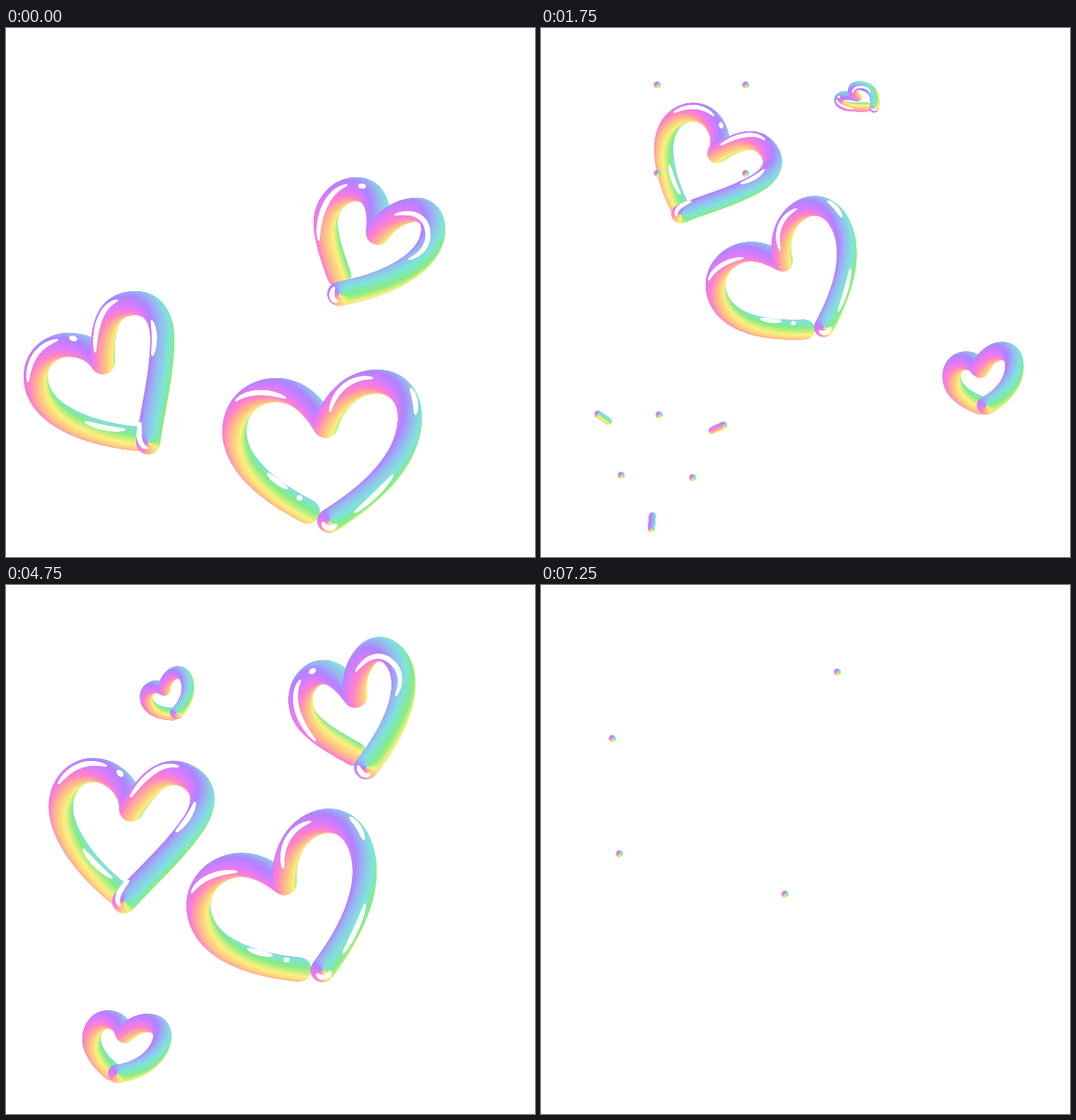
Recreate the animation shown at these times as an HTML page with a canvas. Size 748 by 748 pixels, loop 7.5 s.

```html
<!DOCTYPE html>
<html lang="en">
<head>
<meta charset="utf-8">
<title>Rainbow hearts</title>
<style>
  html, body { margin: 0; height: 100%; overflow: hidden; background: #fff; }
  canvas { display: block; }
</style>
</head>
<body>
<canvas id="stage" width="748" height="748"></canvas>
<script>
const ctx = document.getElementById('stage').getContext('2d');
const STEP = 250, STEPS = 15;
const { PI, sin, cos, min, max } = Math;
const rad = degrees => degrees * PI / 180;

// Tubes are built by stamping a rainbow disc along a path.
const disc = new Path2D();
disc.arc(0, 0, 1, 0, PI * 2);
const rainbow = ctx.createConicGradient(0, 0, 0);
['#7fe3dc', '#84ec86', '#fbf17c', '#ffbe85', '#ff80cc', '#d97bff', '#ae84ff', '#96baf0', '#7fe3dc']
  .forEach((color, i) => rainbow.addColorStop(i / 8, color));

const cache = new Map();
function sample(d) {
  if (!cache.has(d)) {
    const path = document.createElementNS('http://www.w3.org/2000/svg', 'path');
    path.setAttribute('d', d);
    const length = path.getTotalLength(), n = Math.ceil(length);
    cache.set(d, Array.from({ length: n + 1 }, (_, i) => path.getPointAtLength(length * i / n)));
  }
  return cache.get(d);
}

function stamp(d, place, radius, angle, fill) {
  const points = sample(d);
  ctx.fillStyle = fill;
  points.forEach((p, i) => {
    const [x, y] = place(p), r = radius(i / (points.length - 1));
    const c = r * cos(angle), s = r * sin(angle);
    ctx.setTransform(c, s, -s, c, x, y);
    ctx.fill(disc);
  });
}

// Size over time: big hearts stay and then dwindle, small ones swell and collapse.
const dwindle = (life, ease) => k => 1 - (max(0, k - 4) / life) ** ease;
const bloom = (born, life) => k => max(0, sin(PI * min(1, max(0, (k - born) / life)))) ** .7;

// Big hearts pass through a few spots; speed is constant between them.
const SPOT_STEPS = [0, 1, 4, 6, 9];
const travel = spots => k => {
  const i = max(1, SPOT_STEPS.findLastIndex((step, j) => step <= k && j < 4) + 1);
  const t = (k - SPOT_STEPS[i - 1]) / (SPOT_STEPS[i] - SPOT_STEPS[i - 1]);
  return spots[i].map((v, axis) => spots[i - 1][axis] + (v - spots[i - 1][axis]) * t);
};

const bigHeart = (heart, spots) =>
  ({ origin: spots[0], at: travel(spots), tube: 17, size: 1, thinning: 1, ...heart });

const smallHeart = (size, [x, y], [vx, vy], peak, turn, grow) => ({
  d: 'M-5,56C-25,46 -45,30 -45,11C-45,-5 -35,-15 -23,-15C-10,-15 -5,-8 0,0' +
    'C8,-14 20,-24 35,-24C46,-24 53,-15 53,-4C53,20 35,45 3,57',
  origin: [0, 0], tube: 13, thinning: 0, hue: -45, shine: [],
  at: k => [x + vx * (k - peak), y + vy * (k - peak)], size, turn, grow
});

const hearts = [
  bigHeart({
    d: 'M190,581C140,578 42,555 42,493C42,465 65,448 88,448C112,448 128,458 137,473' +
      'C135,430 140,389 183,389C208,389 221,410 221,440C221,490 207,540 201,586',
    hue: -55, turn: k => 8.5 * k, grow: dwindle(5, 3),
    shine: ['M31,500C31,470 46,448 73,441', 'M91,438L99,440', 'M126,458C125,425 134,392 158,385',
      'M206,414Q213,435 207,463', 'M112,557Q140,568 168,568', 'M190,558C186,575 188,592 200,594']
  }, [[137, 473], [144, 451], [177, 318], [235, 212], [275, 110]]),
  bigHeart({
    d: 'M471,350C460,320 452,295 452,275C452,250 472,228 495,228C520,228 530,250 526,290' +
      'C540,268 562,257 580,257C595,257 604,268 604,284C604,325 555,360 471,376',
    hue: -40, turn: k => -10.3 * k, grow: dwindle(3.5, 3),
    shine: ['M442,300C440,265 455,230 482,222', 'M500,223L507,224',
      'M550,264C585,255 600,275 596,300C592,315 582,322 570,327', 'M464,367C457,378 463,388 469,386']
  }, [[526, 290], [527, 268], [494, 157], [458, 107], [425, 78]]),
  bigHeart({
    d: 'M427,684C380,660 323,620 323,570C323,535 350,512 382,512C415,512 435,535 452,563' +
      'C460,535 485,500 525,500C552,500 571,520 571,550C571,605 525,655 457,697',
    hue: -28, turn: k => -33 * sin(PI * k / 12) ** 3, grow: dwindle(9.3, 1.5),
    shine: ['M325,527C340,513 370,512 395,523', 'M458,542C465,510 490,492 518,495',
      'M572,510Q581,525 579,546', 'M493,685Q528,658 547,632', 'M370,630Q382,642 398,651',
      'M413,664L417,665', 'M448,699C450,708 460,710 467,702']
  }, [[452, 563], [447, 534], [394, 422], [350, 361], [326, 270]]),
  smallHeart(.68, [224, 148], [2, -12], 4, k => -6 * k, bloom(1, 4.9)),
  smallHeart(1, [168, 635], [-4, -16], 4, k => 14 - 14 * (k - 4), bloom(1.2, 5.6)),
  smallHeart(1, [621, 504], [0, -22], 6, k => -6 * (k - 6), bloom(4, 4.6))
];

function drawHeart({ d, origin, at, tube, size, thinning, hue, shine, turn, grow }, k) {
  const scale = grow(k);
  if (scale < .3) return;
  const [x, y] = at(k), angle = rad(turn(k)), c = cos(angle), s = sin(angle);
  const sx = size * scale, sy = sx * min(1, scale + .18);
  const thickness = size * scale ** thinning;
  const place = p => {
    const px = p.x - origin[0], py = p.y - origin[1];
    return [x + (px * c - py * s) * sx, y + (px * s + py * c) * sy];
  };
  stamp(d, place, () => tube * thickness, angle + rad(hue), rainbow);
  for (const line of shine) {
    const taper = t => thickness * 3.6 * (.3 + .7 * max(0, sin(PI * t)) ** .5);
    stamp(line, place, taper, 0, '#fff');
  }
}

// Burst pieces, pointing away from the centre, in percent of the piece size.
const DOT = 'M0,0h1', BAR = 'M-50,0H50', HOOK = 'M-48,-38L-40,38L42,20';
const PETAL = 'M-50,0C-16,-28 44,-24 46,2C48,28 -16,16 -50,0';

const ring = (n, radius, phase) => ([x, y]) => Array.from({ length: n }, (_, i) => {
  const a = rad(phase + 360 * i / n);
  return [x + radius * cos(a), y + radius * sin(a)];
});
const burst = (center, at, shape, size, spots, from = at - 1) =>
  ({ center, at, shape, size, from, spots: typeof spots === 'function' ? spots(center) : spots });

const bursts = [
  burst([227, 143], 6, DOT, 5, ring(4, 79, 45)),
  burst([165, 605], 6, DOT, 5, ring(3, 52, 32)),
  burst([165, 605], 6, BAR, 26, ring(3, 84, 95)),
  burst([275, 110], 10, PETAL, 42, [[236, 52], [312, 165]]),
  burst([275, 110], 10, BAR, 32, [[199, 165]]),
  burst([275, 110], 10, HOOK, 60, [[286, 110]]),
  burst([413, 75], 10, BAR, 11, ring(7, 35, 45)),
  burst([413, 75], 10, DOT, 5, [[366, 22], [446, 17], [448, 142]]),
  burst([413, 75], 10, PETAL, 50, [[508, 60], [315, 62], [388, 147]]),
  burst([620, 430], 10, BAR, 27, [[615, 360], [700, 382], [529, 455]]),
  burst([620, 430], 10, DOT, 5, [[671, 347], [579, 463], [621, 521]]),
  burst([318, 240], 10, BAR, 18, [[281, 195], [386, 215], [242, 267]]),
  burst([270, 258], 14, DOT, 5, [[419, 123], [101, 217], [111, 380], [345, 437]], 11)
];

function drawBurst({ center: [cx, cy], at, shape, size, spots, from }, k) {
  if (k < from || k > at + 1) return;
  const spread = 1 + .12 * (k - at);
  const scale = size / 100 * min(1.3, 1 - .3 * (k - at));
  for (const [x, y] of spots) {
    const dx = x - cx, dy = y - cy, r = Math.hypot(dx, dy), c = dx / r, s = dy / r;
    const place = p => [
      cx + dx * spread + (p.x * c - p.y * s) * scale,
      cy + dy * spread + (p.x * s + p.y * c) * scale
    ];
    stamp(shape, place, () => 4.8, rad(-20), rainbow);
  }
}

let shown = -1;
function frame() {
  const k = Math.floor(performance.now() / STEP) % STEPS;
  if (k !== shown) {
    shown = k;
    ctx.setTransform(1, 0, 0, 1, 0, 0);
    ctx.clearRect(0, 0, 748, 748);
    hearts.forEach(heart => drawHeart(heart, k));
    bursts.forEach(group => drawBurst(group, k));
  }
  requestAnimationFrame(frame);
}
frame();
</script>
</body>
</html>
```
